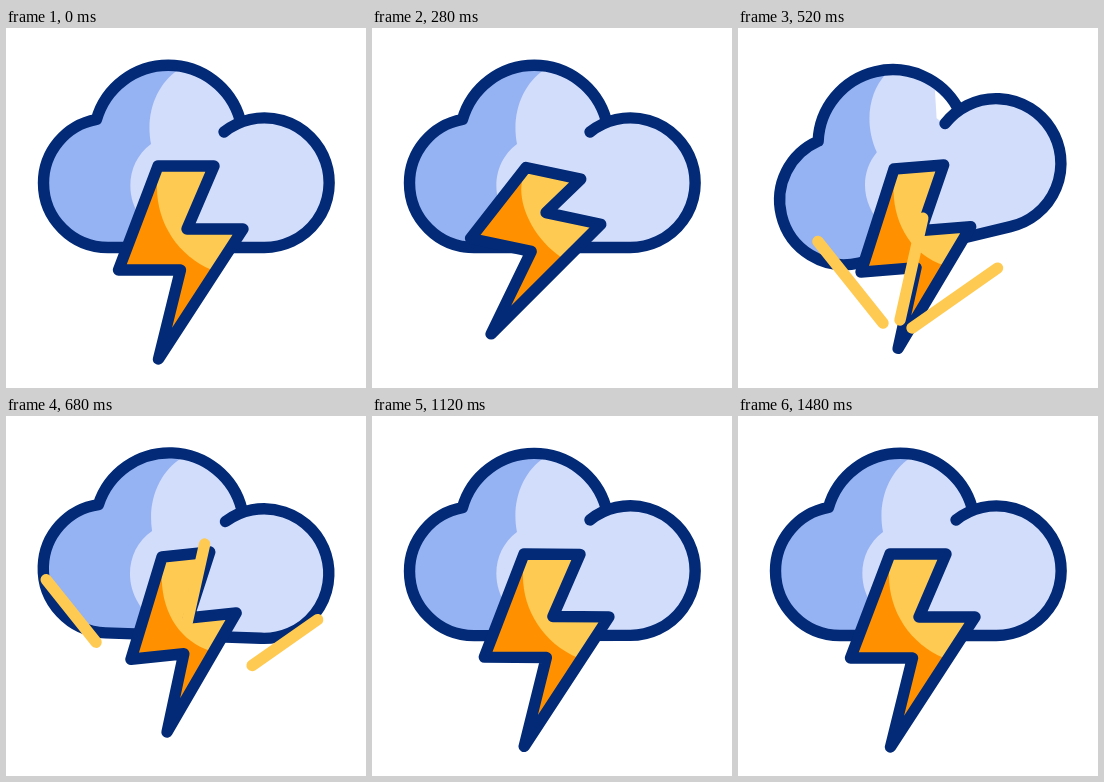
An HTML page for the animation above (2 s loop, 360 by 360 pixels).

```html
<!DOCTYPE html>
<html lang="en">
<head>
<meta charset="utf-8">
<title>Thunderstorm</title>
<style>
  html, body { margin: 0; width: 100%; height: 100%; overflow: hidden; background: #fff; }
  svg { display: block; width: 100vw; height: 100vh; }
  .line { fill: none; stroke: #022a76; stroke-width: 11.4; stroke-linecap: round; stroke-linejoin: round; }
  .ray { stroke: #ffca52; stroke-width: 11.4; stroke-linecap: round; }
</style>
</head>
<body>
<svg viewBox="0 0 360 360">
  <defs>
    <path id="outline" d="M218 104 A64.8 64.8 0 1 1 257.5 219.5 H102
      A64.5 64.5 0 0 1 37.5 155 A64.5 64.5 0 0 1 90.5 91.5 A74.6 74.6 0 0 1 234 91.5"/>
    <clipPath id="inCloud"><use href="#outline"/></clipPath>
    <clipPath id="inBolt"><path class="bolt"/></clipPath>
  </defs>
  <g id="cloud">
    <use href="#outline" fill="#95b2f3"/>
    <g clip-path="url(#inCloud)">
      <path fill="#d2ddfc"
        d="M172 42 C151 56 139 85 145 116 C122 133 118 165 134 189 C146 208 166 219 190 220 H330 V30 H180 Z"/>
      <path id="gap" fill="#fff" d="M216 69 L211 97 L218 105 L231 91 Z"/>
    </g>
    <use href="#outline" class="line"/>
  </g>
  <path class="bolt" fill="#ff9100"/>
  <path id="shine" clip-path="url(#inBolt)" fill="#ffca52"/>
  <path class="bolt line"/>
  <g id="rays"></g>
</svg>
<script>
const LOOP = 2000, STEP = 40;
const $ = id => document.getElementById(id);

// Bolt shapes, measured from the top left corner
const NOTCH = 63;
const boltPath = 'M0,0 L56,0 L29,63 L85,63 L0.5,193 L22.5,104 L-39.5,104 Z';
const shinePath = 'M-1,22 C-1,57 20,90 54,104 L120,92 L120,-20 L-1,-20 Z';

// Start and direction in degrees of each ray
const RAY = 168;
const rayLines = [[145, 295, -128.6], [162, 292, -77.4], [174, 300, -35]];

const clamp = u => Math.min(1, Math.max(0, u));
const span = (t, a, b) => clamp((t - a) / (b - a));
const ease = (t, a, b) => { const u = span(t, a, b); return u * u * (3 - 2 * u); };
const easeOut = (t, a, b) => 1 - (1 - span(t, a, b)) ** 2;
const rad = deg => deg * Math.PI / 180;

// Rises to 1 at the peak time, then rings and fades out
function spring(t, rise, peak, period, decay) {
  if (t < peak) return ease(t, rise, peak);
  const d = t - peak;
  return Math.exp(-decay * d) * Math.cos(2 * Math.PI * d / period) * (1 - ease(t, 1120, 1480));
}

function drawCloud(t) {
  const k = spring(t, 340, 520, 500, 0.0066);
  $('cloud').setAttribute('transform', `translate(${2 * k} ${-k}) rotate(${-13.5 * k} 180 155)`);
  $('gap').style.opacity = +(k > 0.7);
}

function drawBolt(t) {
  const wind = ease(t, 40, 280) - ease(t, 280, 520);
  const recoil = spring(t, 460, 600, 800, 0.0058);
  const shift = ease(t, 40, 520) - ease(t, 920, 1120);
  const turn = rad(12 * wind - 11.8 * recoil);
  const lean = rad(12 * wind - 3 * recoil);
  const size = 1 - 0.28 * Math.max(0, recoil);
  const lift = 23 * wind - 22 * recoil;

  // Level edges turn, the column leans, and all below the notch is lifted
  const place = (x, y) => {
    const v = y - lift * clamp(y / NOTCH);
    return [
      152 + 4 * shift + size * (x * Math.cos(turn) - v * Math.sin(lean)),
      138 + 3 * shift + size * (x * Math.sin(turn) + v * Math.cos(lean))
    ];
  };
  const bend = d => d.replace(/(-?[\d.]+),(-?[\d.]+)/g, (_, x, y) => place(+x, +y).join());

  const d = bend(boltPath);
  document.querySelectorAll('.bolt').forEach(b => b.setAttribute('d', d));
  $('shine').setAttribute('d', bend(shinePath));
}

const rays = rayLines.map(([x, y, deg]) => {
  const line = document.createElementNS('http://www.w3.org/2000/svg', 'line');
  line.setAttribute('class', 'ray');
  line.setAttribute('transform', `translate(${x} ${y}) rotate(${deg})`);
  return $('rays').appendChild(line);
});

function drawRays(t) {
  const head = easeOut(t, 420, 680), tail = ease(t, 520, 830);
  for (const ray of rays) {
    ray.setAttribute('x1', RAY * tail);
    ray.setAttribute('x2', RAY * head);
    ray.style.display = head > tail ? '' : 'none';
  }
}

function draw(now) {
  const t = Math.floor(now % LOOP / STEP) * STEP;
  drawCloud(t);
  drawBolt(t);
  drawRays(t);
}

const start = performance.now();
function tick() {
  draw(performance.now() - start);
  requestAnimationFrame(tick);
}
tick();
</script>
</body>
</html>
```
